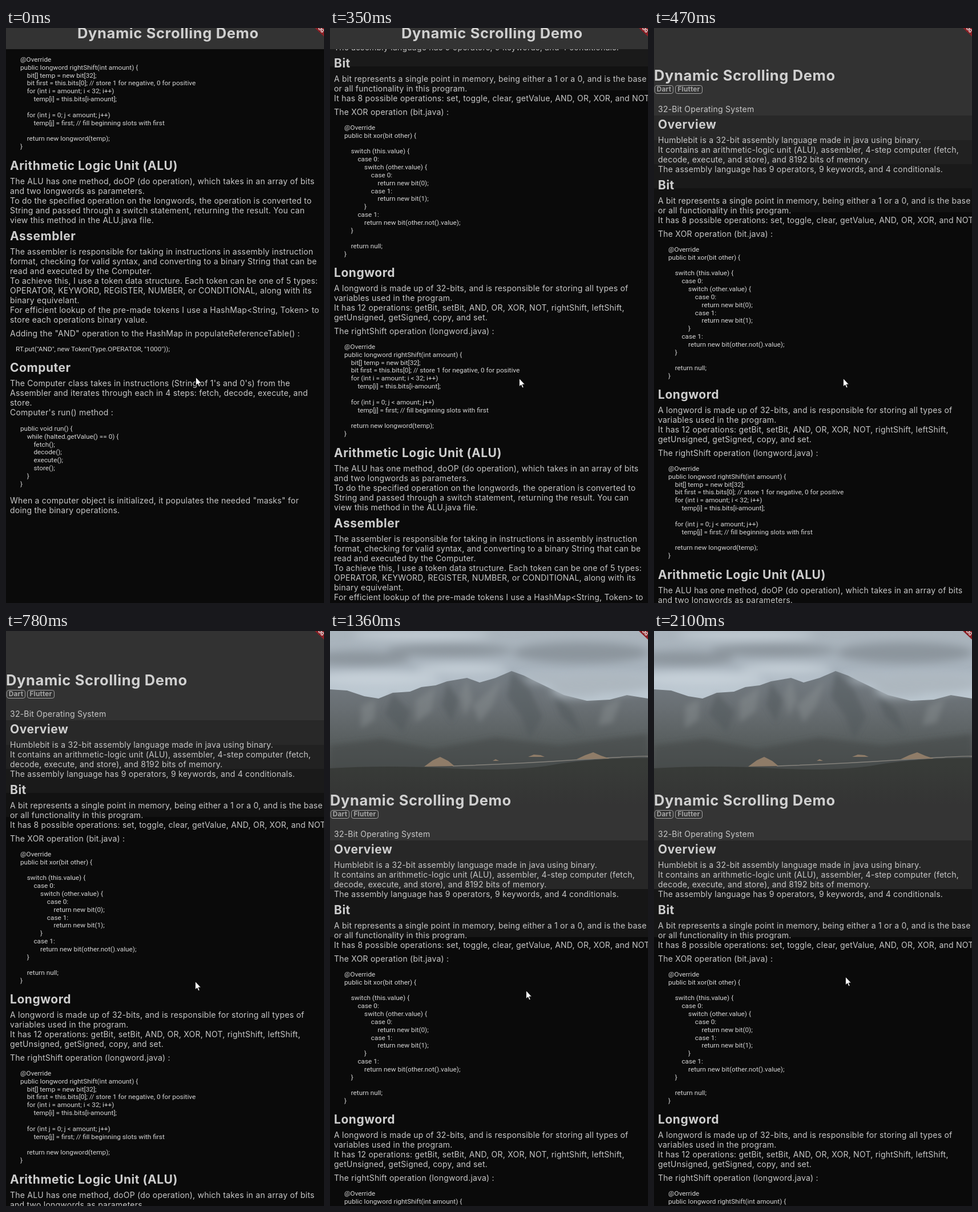
Recreate the animation shown at these times as an HTML page. Size 557x1005 px, loop 2.87 s.

```html
<!DOCTYPE html>
<html lang="en">
<head>
<meta charset="utf-8">
<title>Dynamic Scrolling Demo</title>
<style>
@property --off { syntax: "<length>"; inherits: true; initial-value: 0px; }
@property --shift { syntax: "<length>"; inherits: true; initial-value: 0px; }
@property --bar { syntax: "<number>"; inherits: true; initial-value: 0; }
@property --hero { syntax: "<number>"; inherits: true; initial-value: 0; }

html, body { margin: 0; width: 100%; height: 100%; overflow: hidden; background: #0a0a0a; }
.stage {
  position: relative; width: 557px; height: 1005px; overflow: hidden;
  color: #c8c8c8; font: 14px/17px Inter, sans-serif; font-optical-sizing: none;
  animation: scroll 2870ms step-end infinite;
}
.stage > *, .page > * { position: absolute; margin: 0; }
.page {
  left: 0; top: 0; width: 557px; height: 1933px;
  transform: translateY(calc(-1 * var(--off)));
  background: linear-gradient(#323232 366px, #282828 0 409px, #212121 0 451px,
    #1a1a1a 0 493px, #121212 0 535px, #0a0a0a 0);
}
.hero {
  left: 0; top: 0; width: 557px; height: 535px; opacity: var(--hero);
  background: linear-gradient(#343434 366px, #272727 0 451px, #161616 0);
}
pre, h2 { white-space: pre; }
pre { left: 7px; font: inherit; letter-spacing: .23px; }
h2 { left: 7px; font-size: 21px; line-height: 26px; font-weight: 700; letter-spacing: .52px; color: #cecece; }
pre.code { left: 25px; font: 11.8px/13.82px Roboto, sans-serif; letter-spacing: 0; color: #d6d6d6; }
.chip {
  top: 313px; height: 15px; box-sizing: border-box; border: 1px solid #a4a4a4; border-radius: 4px;
  font-size: 11.8px; line-height: 13.5px; font-weight: 700; letter-spacing: .2px; text-align: center; color: #a4a4a4;
}
.bar { left: 0; top: 0; width: 557px; height: 37px; background: #333; opacity: var(--bar); }
h1 {
  left: var(--shift); top: max(-6px, 281px - var(--off)); white-space: pre;
  font-size: 25.5px; line-height: 30px; font-weight: 700; letter-spacing: .62px; color: #d0d0d0;
}
.ribbon { left: 537px; top: 0; }
.cursor { left: 0; top: 0; overflow: visible; animation: point 2870ms step-end infinite; }

@keyframes scroll {
  0% { --off: 928px; --shift: 125px; --bar: 1; --hero: 0; }
  9.756% { --off: 720px; --shift: 125px; --bar: 1; --hero: 0; }
  12.195% { --off: 426px; --shift: 125px; --bar: 1; --hero: 0; }
  14.286% { --off: 250px; --shift: 0px; --bar: 0; --hero: 0; }
  16.376% { --off: 213px; --shift: 0px; --bar: 0; --hero: 0; }
  27.178% { --off: 210px; --shift: 0px; --bar: 0; --hero: 0; }
  29.268%, 100% { --off: 0px; --shift: 0px; --bar: 0; --hero: 1; }
}
@keyframes point {
  0% { transform: translate(332px, 610px); }
  9.756% { transform: translate(331px, 612px); }
  47.387% { transform: translate(343px, 628px); }
  49.826% { transform: translate(420px, 674px); }
  51.916% { transform: translate(462px, 699px); }
  57.143% { transform: translate(453px, 692px); }
  59.93% { transform: translate(428px, 676px); }
  62.718% { transform: translate(398px, 656px); }
  65.157% { transform: translate(370px, 634px); }
  67.944% { transform: translate(350px, 617px); }
  70.383% { transform: translate(340px, 609px); }
  73.171%, 100% { transform: translate(335px, 604px); }
}
</style>
</head>
<body>
<div class="stage">
<div class="page">
<div class="hero">
<svg width="557" height="335" viewBox="0 0 557 335">
  <defs>
    <linearGradient id="sky" x2="0" y2="1">
      <stop stop-color="#aab4bc"/><stop offset=".45" stop-color="#a8b3bd"/><stop offset=".75" stop-color="#bcc8d1"/>
    </linearGradient>
    <linearGradient id="rock" x2="0" y2="1">
      <stop stop-color="#757d84"/><stop offset=".3" stop-color="#686e72"/>
      <stop offset=".6" stop-color="#565c5c"/><stop offset="1" stop-color="#3e4240"/>
    </linearGradient>
    <linearGradient id="fade" x2="0" y2="1">
      <stop stop-color="#343434" stop-opacity="0"/><stop offset=".7" stop-color="#343434"/>
    </linearGradient>
    <filter id="soft" x="-30%" y="-60%" width="160%" height="220%"><feGaussianBlur stdDeviation="8"/></filter>
    <filter id="haze"><feGaussianBlur stdDeviation="5"/></filter>
  </defs>
  <path fill="url(#sky)" d="M0 0H557V140H0z"/>
  <g filter="url(#soft)">
    <g fill="#8c959d">
      <ellipse cx="50" cy="48" rx="90" ry="13"/><ellipse cx="210" cy="34" rx="110" ry="11"/>
      <ellipse cx="440" cy="38" rx="120" ry="18"/>
    </g>
    <g fill="#c6d0d8">
      <ellipse cx="80" cy="84" rx="110" ry="13"/><ellipse cx="230" cy="66" rx="80" ry="9"/>
      <ellipse cx="160" cy="7" rx="120" ry="7"/>
    </g>
  </g>
  <path fill="url(#rock)" d="M0 102L30 104 60 114 85 118 110 108 140 106 160 98 185 95 205 88 240 82 262 90 290 82 318 70 340 78 360 88 385 100 410 112 450 122 490 120 520 112 557 118V290H0z"/>
  <g filter="url(#haze)">
    <path fill="#4e565a" opacity=".5" d="M318 71L350 102 372 150 350 190 335 150 310 115zM205 89L225 120 214 160 196 130zM110 109L140 140 128 178 96 145zM385 101L425 140 440 180 405 150z"/>
    <path fill="#8b9093" opacity=".45" d="M300 85L285 130 262 160 250 130zM185 98L178 140 150 160 150 120zM240 84L250 120 236 150 228 110zM80 120L78 155 54 170 55 130zM510 118L495 160 470 165 480 130z"/>
    <path fill="#454a48" opacity=".6" d="M0 200L90 188 180 206 290 186 400 200 557 180V300H0z"/>
  </g>
  <path fill="#383b38" d="M0 240Q100 234 210 240T390 234 557 222V300H0z"/>
  <path fill="none" stroke="#85827c" stroke-width="1.5" d="M215 236Q330 232 435 225T557 219"/>
  <path fill="#8f7c68" d="M165 237L180 226 193 220 207 227 218 236zM432 224L447 217 461 212 475 218 490 223zM347 220L357 216 369 217 376 220zM285 227L290 224 296 227z"/>
  <g filter="url(#soft)" fill="#adb7bf">
    <ellipse cx="475" cy="91" rx="92" ry="18"/><ellipse cx="375" cy="82" rx="32" ry="8"/><ellipse cx="430" cy="108" rx="45" ry="8"/>
  </g>
  <path fill="url(#fade)" d="M0 235H557V335H0z"/>
</svg>
</div>
<div class="chip" style="left:1px;width:33px">Dart</div>
<div class="chip" style="left:37px;width:48px">Flutter</div>

<pre style="top:346px">32-Bit Operating System</pre>
<h2 style="top:369px">Overview</h2>
<pre style="top:400px">Humblebit is a 32-bit assembly language made in java using binary.
It contains an arithmetic-logic unit (ALU), assembler, 4-step computer (fetch,
decode, execute, and store), and 8192 bits of memory.
The assembly language has 9 operators, 9 keywords, and 4 conditionals.</pre>

<h2 style="top:475px">Bit</h2>
<pre style="top:506px">A bit represents a single point in memory, being either a 1 or a 0, and is the base
or all functionality in this program.
It has 8 possible operations: set, toggle, clear, getValue, AND, OR, XOR, and NOT.</pre>
<pre style="top:564px">The XOR operation (bit.java) :</pre>
<pre class="code" style="top:594px">@Override
public bit xor(bit other) {

    switch (this.value) {
        case 0:
            switch (other.value) {
                case 0:
                    return new bit(0);
                case 1:
                    return new bit(1);
            }
        case 1:
            return new bit(other.not().value);
    }

    return null;
}</pre>

<h2 style="top:841px">Longword</h2>
<pre style="top:872px">A longword is made up of 32-bits, and is responsible for storing all types of
variables used in the program.
It has 12 operations: getBit, setBit, AND, OR, XOR, NOT, rightShift, leftShift,
getUnsigned, getSigned, copy, and set.</pre>
<pre style="top:947px">The rightShift operation (longword.java) :</pre>
<pre class="code" style="top:977px">@Override
public longword rightShift(int amount) {
    bit[] temp = new bit[32];
    bit first = this.bits[0]; // store 1 for negative, 0 for positive
    for (int i = amount; i &lt; 32; i++)
        temp[i] = this.bits[i-amount];

    for (int j = 0; j &lt; amount; j++)
        temp[j] = first; // fill beginning slots with first

    return new longword(temp);
}</pre>

<h2 style="top:1156px">Arithmetic Logic Unit (ALU)</h2>
<pre style="top:1187px">The ALU has one method, doOP (do operation), which takes in an array of bits
and two longwords as parameters.
To do the specified operation on the longwords, the operation is converted to
String and passed through a switch statement, returning the result. You can
view this method in the ALU.java file.</pre>

<h2 style="top:1279px">Assembler</h2>
<pre style="top:1310px">The assembler is responsible for taking in instructions in assembly instruction
format, checking for valid syntax, and converting to a binary String that can be
read and executed by the Computer.
To achieve this, I use a token data structure. Each token can be one of 5 types:
OPERATOR, KEYWORD, REGISTER, NUMBER, or CONDITIONAL, along with its
binary equivelant.
For efficient lookup of the pre-made tokens I use a HashMap&lt;String, Token&gt; to
store each operations binary value.</pre>
<pre style="top:1453px">Adding the "AND" operation to the HashMap in populateReferenceTable() :</pre>
<pre class="code" style="top:1483px;left:17px">RT.put("AND", new Token(Type.OPERATOR, "1000"));</pre>

<h2 style="top:1509px">Computer</h2>
<pre style="top:1540px">The Computer class takes in instructions (String of 1's and 0's) from the
Assembler and iterates through each in 4 steps: fetch, decode, execute, and
store.
Computer's run() method :</pre>
<pre class="code" style="top:1622px">public void run() {
    while (halted.getValue() == 0) {
        fetch();
        decode();
        execute();
        store();
    }
}</pre>
<pre style="top:1745px">When a computer object is initialized, it populates the needed "masks" for
doing the binary operations.</pre>
</div>

<div class="bar"></div>
<h1>Dynamic Scrolling Demo</h1>
<svg class="ribbon" width="20" height="20">
  <path fill="#8c2026" d="M4 0H20V15z"/>
  <text transform="translate(5 -3) rotate(45)" font-family="Roboto, sans-serif" font-size="8.5" font-weight="900" fill="#e6dcdc">BUG</text>
</svg>
<svg class="cursor" width="12" height="19">
  <path fill="#fff" stroke="#000" stroke-width=".8" d="M.5 .5V14.8L3.8 11.8 6 17 8.2 16 6 11H10.4z"/>
</svg>
</div>
</body>
</html>
```
